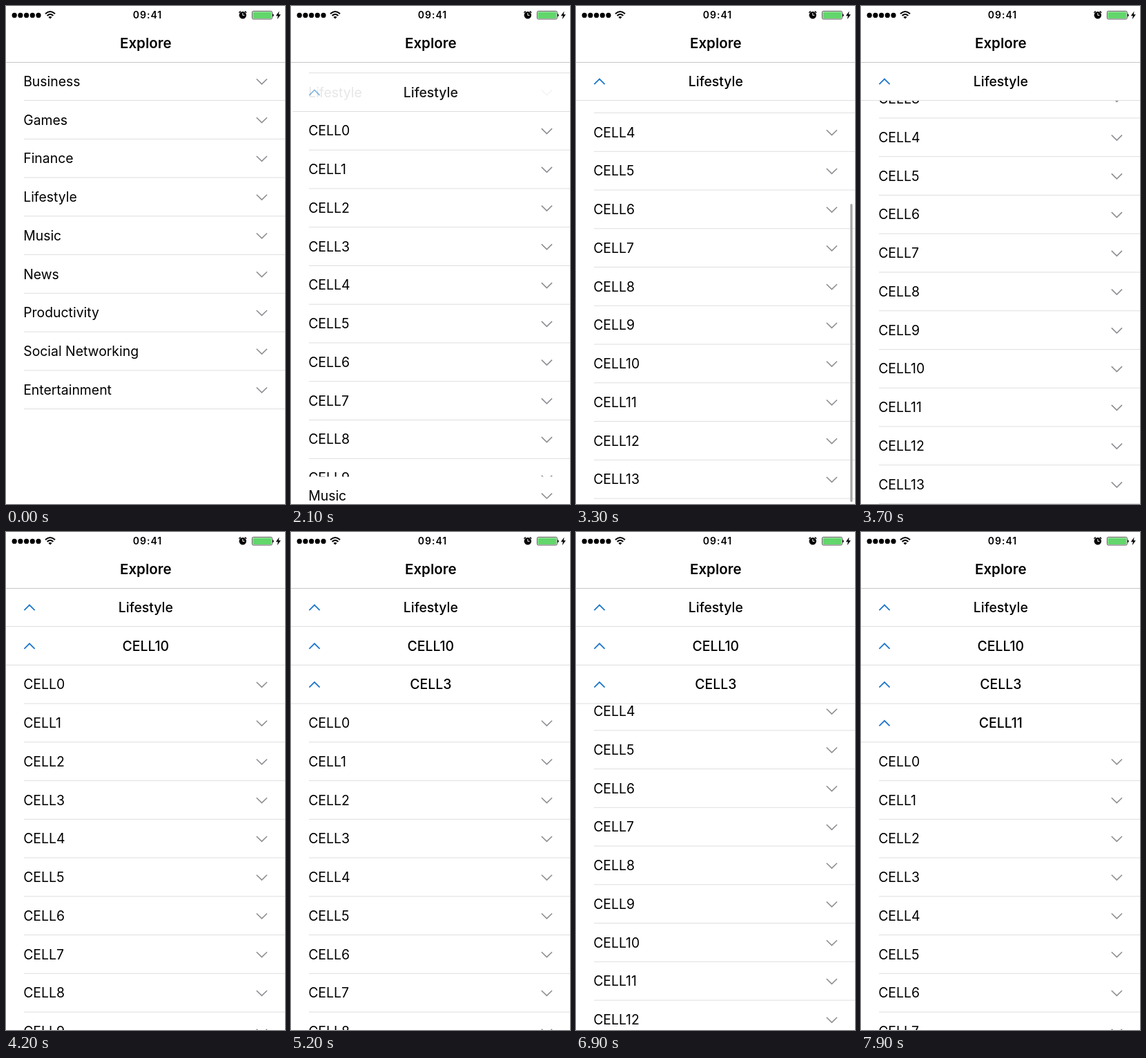
An HTML page for the animation above (8000 ms loop, 404 by 720 pixels).

```html
<!DOCTYPE html>
<html lang="en">
<head>
<meta charset="utf-8">
<title>Explore</title>
<style>
html, body { margin: 0; width: 100%; height: 100%; overflow: hidden; background: #fff; }
#stage { display: block; width: 404px; height: 720px; font-family: Inter, Roboto, sans-serif; }
text { fill: #000; font-size: 19.4px; }
.head { font-weight: 500; text-anchor: middle; }
.title { font-size: 20.5px; font-weight: 600; text-anchor: middle; }
.time { font-size: 14px; font-weight: 600; letter-spacing: 1px; text-anchor: middle; }
.down, .up { fill: none; stroke: #8e8e93; stroke-width: 1.6; }
.up { stroke: #1e76cc; stroke-width: 1.8; }
.line { fill: #dededf; }
</style>
</head>
<body>
<svg id="stage" viewBox="0 0 404 720" width="404" height="720">
  <rect width="404" height="720" fill="#fff"/>
  <g id="lists"></g>
  <rect id="bar" x="397.2" width="3.2" rx="1.6" fill="#a6a6a8"/>
  <rect width="404" height="81.3" fill="#fff"/>
  <rect y="81" width="404" height="1" fill="#c6c6c9"/>
  <g id="dots"></g>
  <g fill="none" stroke="#000" stroke-width="2">
    <path d="M57 11.2Q64 4.8 71 11.2"/>
    <path d="M59.6 14Q64 10 68.4 14"/>
  </g>
  <path d="M61.4 16Q64 13.8 66.6 16L64 18.6Z"/>
  <text class="time" x="205" y="18.2">09:41</text>
  <g fill="none" stroke="#000" stroke-width="1.4" stroke-linecap="round">
    <circle cx="342.8" cy="13.3" r="5.2" fill="#000" stroke="none"/>
    <path d="M337.8 9.3L339.4 7.9M347.8 9.3L346.2 7.9"/>
    <path d="M342.8 10.4V13.4H345" stroke="#fff" stroke-width="1"/>
  </g>
  <rect x="356.4" y="7.4" width="29" height="11.6" rx="1.8" fill="#fff" stroke="#444" stroke-width=".9"/>
  <rect x="357.4" y="8.4" width="27" height="9.6" rx="1" fill="#62d76b"/>
  <path d="M386 11.2Q387.8 11.4 387.8 13.3T386 15.4Z" fill="#222"/>
  <path d="M395.6 7.6L390.8 14.2H393.8L392.8 19.2L397.8 12.3H394.7Z"/>
  <text class="title" x="202.3" y="60.8">Explore</text>
</svg>
<script>
const NS = 'http://www.w3.org/2000/svg';
const LOOP = 8000, STEP = 100, TOP = 81.3, ROW = 55.75, BOTTOM = 720, INDENT = 26;
const categories = ['Business', 'Games', 'Finance', 'Lifestyle', 'Music', 'News',
  'Productivity', 'Social Networking', 'Entertainment'];
const cells = Array.from({ length: 14 }, (_, i) => 'CELL' + i);

// Each level: its rows, the row that gets opened and when, and its scroll as [time, offset].
const levels = [
  { names: categories, pick: 3, open: 2000 },
  { names: cells, pick: 10, open: 3850, hide: 3700,
    scroll: [[2700, 0], [2800, 45], [2900, 120], [3000, 177], [3100, 204], [3200, 208], [3400, 202], [3600, 197.6]] },
  { names: cells, pick: 3, open: 4850 },
  { names: cells, pick: 11, open: 7050, hide: 6600,
    scroll: [[5500, 0], [5600, 14], [5700, 45], [5800, 80], [5900, 114], [6000, 152], [6100, 187], [6200, 215], [6300, 232], [6400, 240]] },
  { names: cells, pick: -1, open: Infinity }
];

function set(el, attrs) {
  for (const key in attrs) el.setAttribute(key, attrs[key]);
}

function add(parent, tag, attrs, content) {
  const el = document.createElementNS(NS, tag);
  set(el, attrs);
  if (content) el.textContent = content;
  parent.appendChild(el);
  return el;
}

const clamp = v => Math.max(0, Math.min(1, v));
const mix = (a, b, k) => a + (b - a) * k;

// Critically damped spring from 0 to 1
function spring(ms) {
  if (ms <= 0) return 0;
  const x = ms * 0.0395;
  return x > 14 ? 1 : 1 - (1 + x) * Math.exp(-x);
}

function track(keys, t) {
  if (!keys || t <= keys[0][0]) return 0;
  for (let i = 1; i < keys.length; i++) {
    const [t0, v0] = keys[i - 1], [t1, v1] = keys[i];
    if (t < t1) return mix(v0, v1, (t - t0) / (t1 - t0));
  }
  return keys[keys.length - 1][1];
}

function buildRow(parent, name, picked) {
  const g = add(parent, 'g', {});
  const row = { g };
  row.label = add(g, 'text', { x: 25.2, y: 34.5 }, name);
  row.down = add(g, 'path', { class: 'down', d: 'M362.8 24.2L370.4 31.6L378 24.2' });
  row.line = add(g, 'rect', { class: 'line', x: INDENT, y: ROW - 1, width: 404 - INDENT, height: 1 });
  if (picked) {
    row.head = add(g, 'text', { class: 'head', x: 202.3, y: 34.7 }, name);
    row.up = add(g, 'path', { class: 'up', d: 'M26.4 31.8L34 24.2L41.6 31.8' });
  }
  return row;
}

const lists = document.getElementById('lists');
const bar = document.getElementById('bar');
const dots = document.getElementById('dots');
for (let i = 0; i < 5; i++) add(dots, 'circle', { cx: 12.2 + i * 8.7, cy: 13.4, r: 3.6 });

for (const level of levels) {
  level.clip = add(lists, 'svg', { x: 0, width: 404 });
  level.body = add(level.clip, 'g', {});
  level.rows = level.names.map((name, i) => buildRow(level.body, name, i === level.pick));
}

// Turn a list row into a pinned header
function morph(row, p) {
  set(row.label, { opacity: 1 - p });
  set(row.down, { opacity: 1 - p });
  set(row.head, { opacity: p });
  set(row.up, { opacity: clamp((p - 0.8) * 5) });
  const x = INDENT * (1 - p);
  set(row.line, { x, width: 404 - x });
}

function drawBar(level, base, offset, t) {
  const total = level.names.length * ROW, view = BOTTOM - base, length = view - 6;
  const at = Math.min(offset, total - view);
  set(bar, {
    y: base + 3 + at / total * length,
    height: view / total * length,
    opacity: clamp((level.hide - t) / 200)
  });
}

function draw(t) {
  let base = TOP, limit = BOTTOM, shown = true;
  set(bar, { opacity: 0 });
  for (const level of levels) {
    level.clip.style.display = shown ? '' : 'none';
    if (!shown) continue;
    const { pick, rows } = level;
    const p = spring(t - level.open), offset = track(level.scroll, t);
    set(level.clip, { y: base, height: Math.max(0, limit - base) });
    set(level.body, { transform: `translate(0 ${-base})` });

    const start = base - offset;
    const from = start + pick * ROW;
    const top = mix(from, base, p);
    const next = mix(from + ROW, BOTTOM, p);
    rows.forEach((row, i) => {
      const y = pick < 0 ? start + i * ROW
        : i <= pick ? top + (i - pick) * ROW
        : next + (i - pick - 1) * ROW;
      set(row.g, { transform: `translate(0 ${y})` });
    });
    if (pick >= 0) morph(rows[pick], p);
    if (level.scroll && t > level.scroll[0][0] && t < level.hide) drawBar(level, base, offset, t);

    shown = p > 0;
    base = top + ROW;
    limit = next;
  }
}

function tick() {
  const t = performance.now() % LOOP;
  draw(Math.floor(t / STEP) * STEP);
  requestAnimationFrame(tick);
}
tick();
</script>
</body>
</html>
```
